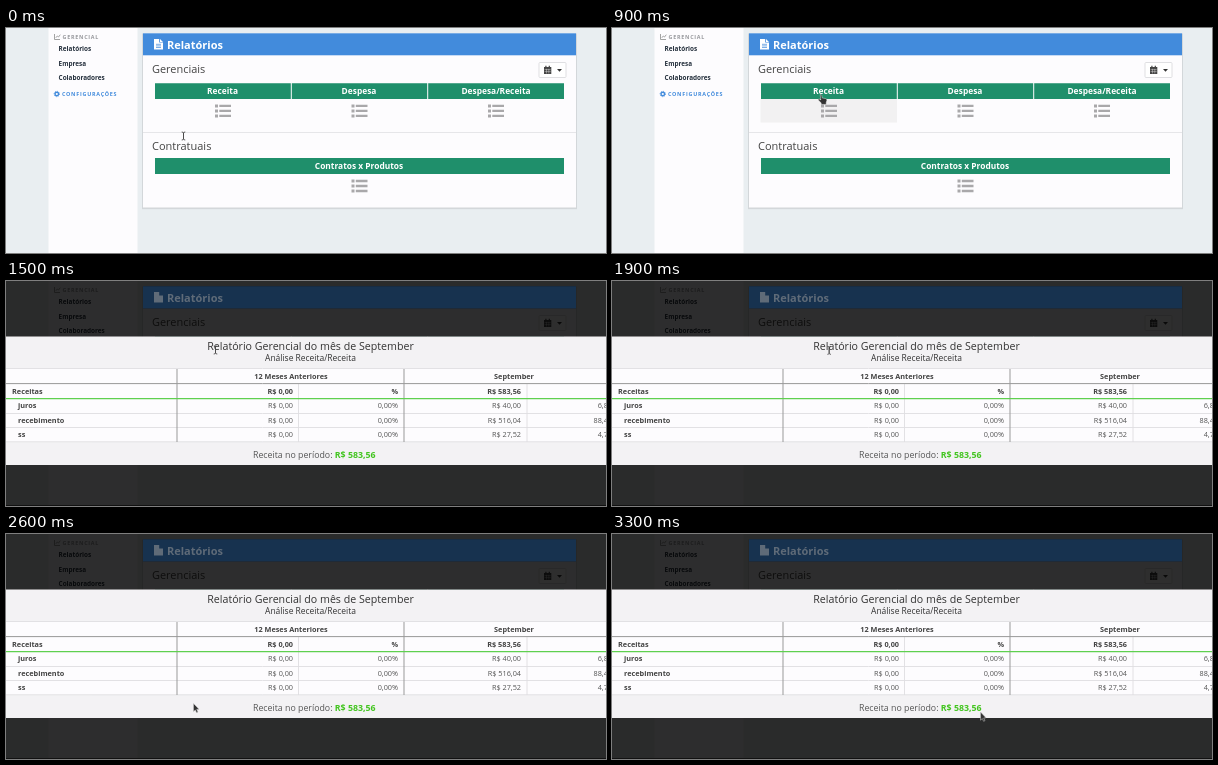
These frames come from a looping animation (600 by 225 pixels, 3400 ms). An HTML page:

```html
<!DOCTYPE html>
<html lang="pt">
<head>
<meta charset="utf-8">
<title>Relatórios</title>
<style>
html, body { margin: 0; width: 100%; height: 100%; overflow: hidden; background: #e9eef1; }
svg { display: block; width: 100%; height: 100%; font-family: "Open Sans", "Noto Sans", sans-serif; }
.b { font-weight: 700; }
.m { text-anchor: middle; }
.e { text-anchor: end; }
.caps { font-size: 5.4px; font-weight: 700; letter-spacing: .75px; }
.item { font-size: 6.4px; font-weight: 700; fill: #25303d; }
.head { font-size: 8.4px; font-weight: 700; fill: #fff; text-anchor: middle; }
.cell { font-size: 7.3px; fill: #555; }
.cell .b { fill: #444; }
</style>
</head>
<body>
<svg viewBox="0 0 600 225">
  <defs>
    <g id="list" fill="#a9a8aa">
      <path d="M-8 0h3v3h-3zm0 5h3v3h-3zm0 5h3v3h-3zM-3.7.3H8v2.4H-3.7zm0 5H8v2.4H-3.7zm0 5H8v2.4H-3.7z"/>
    </g>
  </defs>

  <g id="page">
    <rect width="600" height="225" fill="#e9eef1"/>
    <rect x="42.5" width="89" height="225" fill="#fdfcfe"/>
    <path d="M48.5 6v5.5h5.5M49.8 9.8l1.5-1.8 1.2 1 1.8-2.3" fill="none" stroke="#999" stroke-width=".9"/>
    <text class="caps" x="56.5" y="11.2" fill="#97989c">GERENCIAL</text>
    <text class="item" x="52.6" y="23">Relatórios</text>
    <text class="item" x="52.6" y="37.5">Empresa</text>
    <text class="item" x="52.6" y="52">Colaboradores</text>
    <circle cx="50.8" cy="66" r="1.8" fill="none" stroke="#428bdc" stroke-width="1.4"/>
    <circle cx="50.8" cy="66" r="2.7" fill="none" stroke="#428bdc" stroke-width=".8" stroke-dasharray="1.06"/>
    <text class="caps" x="56" y="68" fill="#428bdc">CONFIGURAÇÕES</text>

    <rect x="136" y="5.5" width="435" height="175.7" fill="#d3d7da"/>
    <rect x="137" y="5" width="433" height="174.5" fill="#fdfcfe"/>
    <rect x="137" y="5.3" width="433" height="22" fill="#428bdc"/>
    <path d="M148 11h5.2v3.6h3.8v7h-9zM154 11l3 2.9h-3z" fill="#fff"/>
    <path d="M150 16.3h5m-5 1.6h5m-5 1.6h5" stroke="#428bdc" stroke-width=".7"/>
    <text class="b" x="161" y="20.5" font-size="11" fill="#fff">Relatórios</text>

    <text x="146" y="45" font-size="10.95" fill="#444">Gerenciais</text>
    <rect x="533" y="34.5" width="27" height="15" rx="1" fill="#fff" stroke="#dcdcdf" stroke-width=".9"/>
    <path d="M538 39h7.3v7H538zM539.3 37.8h1.2v1.5h-1.2zm3.4 0h1.2v1.5h-1.2z" fill="#444"/>
    <path d="M538.6 41.6h6.1m-6.1 2h6.1M540.5 40.8v4.7m2.3-4.7v4.7" stroke="#ddd" stroke-width=".45"/>
    <path d="M551 41h5l-2.5 2.7z" fill="#333"/>

    <rect id="hover" x="148.5" y="71" width="136.5" height="23.5" fill="#f2f1f2"/>
    <path d="M149 55.3h135.8v15.8H149zm136.8 0h135.4v15.8H285.8zm136.4 0H558v15.8H422.200zM149 130h409v16H149z" fill="#1f8f6b"/>
    <text class="head" x="216.500" y="66.200">Receita</text>
    <text class="head" x="353" y="66.2">Despesa</text>
    <text class="head" x="490" y="66.2">Despesa/Receita</text>
    <text class="head" x="353" y="141.200">Contratos x Produtos</text>
    <use href="#list" x="217" y="76.4"/>
    <use href="#list" x="353.500" y="76.4"/>
    <use href="#list" x="490" y="76.4"/>
    <use href="#list" x="353.5" y="151.5"/>
    <path d="M137 104.500h433" stroke="#e6e6e9"/>
    <text x="146" y="122" font-size="11" fill="#444">Contratuais</text>
  </g>

  <g id="modal">
    <rect width="600" height="225" fill="#000" opacity=".82"/>
    <rect x="137" y="5.3" width="433" height="22" fill="#17324f"/>
    <path d="M148 11h5.2v3.6h3.8v7h-9z" fill="#5f6b78"/>
    <text class="b" x="161" y="20.5" font-size="11" fill="#5f6b78">Relatórios</text>
    <rect y="224" width="600" height="1" fill="#111"/>
    <rect y="55.500" width="600" height="128.500" fill="#f3f2f4"/>
    <rect y="87" width="600" height="74" fill="#fdfcfe"/>
    <text class="m" x="304.500" y="69" font-size="10.65" fill="#333">Relatório Gerencial do mês de September</text>
    <text class="m" x="304.500" y="80" font-size="8.48" fill="#333">Análise Receita/Receita</text>
    <g fill="none">
      <path d="M0 87.500h600M0 132.500h600M0 146.500h600M0 160.800h600M292.500 103v58M521 103v58" stroke="#dfdee1" stroke-width=".9"/>
      <path d="M0 102.600h600M171 88v73M398 88v73" stroke="#999"/>
      <path d="M0 117.600h600" stroke="#5fd04f" stroke-width="1.300"/>
    </g>
    <g class="cell" id="table">
      <text class="b m" x="285" y="98.300">12 Meses Anteriores</text>
      <text class="b m" x="508" y="98.300">September</text>
    </g>
    <text x="247" y="177" font-size="8.8" fill="#555">Receita no período: <tspan class="b" fill="#42c51f">R$ 583,56</tspan></text>
  </g>

  <g id="cursor">
    <path id="beam" d="M-1.8-4q1.800 0 1.800 1v6q0 1 1.800 1M1.800-4Q0-4 0-3v6Q0 4-1.800 4" fill="none" stroke="#444" stroke-width=".8"/>
    <path id="hand" d="M-2.300-4.700q1-.7 1.500.4L-.3-1.500 3.200-.9q1.300.3 1.200 1.600L3.700 3v1.900h-5V3.500L-4.200.4q-.3-1.200.9-1l1.600 1z" fill="#333" stroke="#fff" stroke-width=".4"/>
    <path id="arrow" d="M0 0v8.200l1.800-1.600 1.300 2.700 1.400-.7-1.300-2.600 2.300-.2z" fill="#333" stroke="#ccc" stroke-width=".5"/>
  </g>
</svg>
<script>
const $ = id => document.getElementById(id);
const show = (id, on) => { $(id).style.display = on ? "" : "none"; };

const rows = [
  ["Receitas", "R$ 0,00", "%", "R$ 583,56", ""],
  ["juros", "R$ 0,00", "0,00%", "R$ 40,00", "6,85%"],
  ["recebimento", "R$ 0,00", "0,00%", "R$ 516,04", "88,43%"],
  ["ss", "R$ 0,00", "0,00%", "R$ 27,52", "4,72%"]
];
const ends = [0, 287, 392, 515, 612];
$("table").innerHTML += rows.map((row, r) => row.map((text, c) => {
  const x = c ? ends[c] : r ? 12 : 6;
  const style = (c ? "e" : "") + (r && c ? "" : " b");
  return `<text class="${style}" x="${x}" y="${113 + r * 14.4}">${text}</text>`;
}).join("")).join("");

// Pointer path: time, x, y, shape
const path = [
  [0, 177.5, 108, "beam"], [300, 182, 98, "beam"], [400, 190, 90, "hand"],
  [500, 196.5, 84, "hand"], [600, 200, 81, "hand"], [900, 210.5, 71.5, "hand"],
  [1400, 210.5, 71.5, "hand"], [1500, 209.5, 69, "beam"], [1700, 209.5, 69, "beam"],
  [2000, 221, 69.5, "beam"], [2100, 221, 69.5, "beam"], [2200, 209.5, 99, "arrow"],
  [2700, 182, 187, "arrow"], [2900, 275, 186, "arrow"], [3300, 368.5, 178, "arrow"],
  [3400, 368.5, 178, "arrow"]
];

function draw(now) {
  const t = Math.floor(now % 3400 / 100) * 100;
  const i = path.findIndex(p => p[0] > t) - 1;
  const [t0, x0, y0, shape] = path[i], [t1, x1, y1] = path[i + 1];
  const k = (t - t0) / (t1 - t0);
  $("cursor").setAttribute("transform", `translate(${x0 + (x1 - x0) * k} ${y0 + (y1 - y0) * k})`);
  for (const id of ["beam", "hand", "arrow"]) show(id, id === shape);
  show("hover", t >= 400 && t < 1500);
  show("modal", t >= 1500);
}

const start = performance.now();
function tick() {
  draw(performance.now() - start);
  requestAnimationFrame(tick);
}
tick();
</script>
</body>
</html>
```
